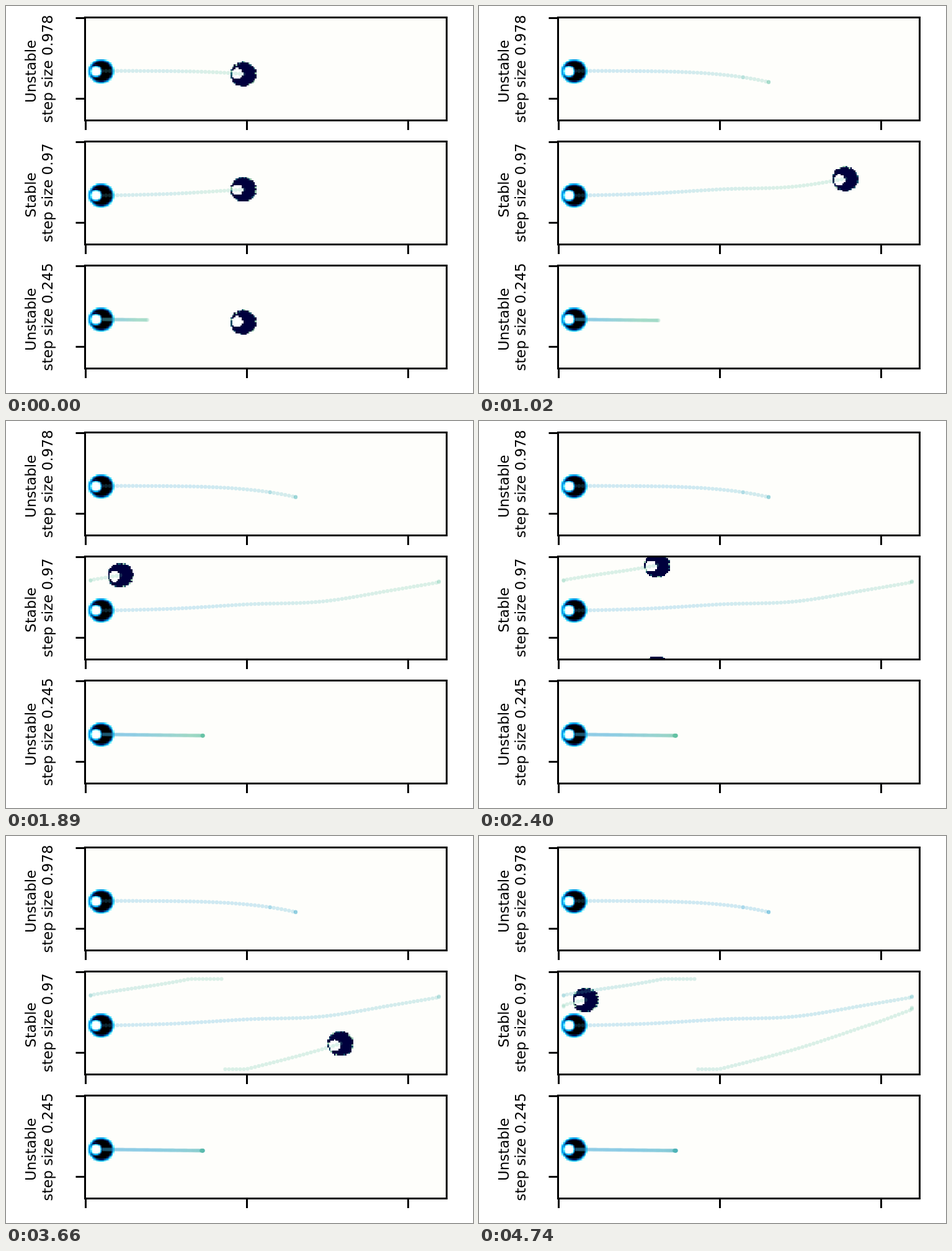
Recreate the animation shown at these times as an HTML page with a canvas. Size 753x624 px, loop 4770 ms.

```html
<!DOCTYPE html>
<html lang="en">
<head>
<meta charset="utf-8">
<title>Step size stability</title>
<style>
  html, body { margin: 0; width: 100%; height: 100%; overflow: hidden; background: #fff; }
  canvas, svg { position: absolute; left: 0; top: 0; }
  text { font: 22.92px "DejaVu Sans", sans-serif; text-anchor: middle; }
</style>
</head>
<body>
<canvas id="stage" width="753" height="624"></canvas>
<svg width="753" height="624">
  <defs>
    <g id="axes" fill="none" stroke="#000" stroke-width="3">
      <rect x="127.5" y="18.5" width="583" height="166"/>
      <path d="M128.5 185v15M388.5 185v15M648.5 185v15M112.5 19.5H128M112.5 149.5H128"/>
    </g>
  </defs>
  <use href="#axes"/>
  <use href="#axes" y="200"/>
  <use href="#axes" y="400"/>
  <g transform="translate(48 105.4) rotate(-90)"><text>Unstable</text></g>
  <g transform="translate(75 101.5) rotate(-90)"><text>step size 0.978</text></g>
  <g transform="translate(48 304.6) rotate(-90)"><text>Stable</text></g>
  <g transform="translate(75 301.2) rotate(-90)"><text>step size 0.97</text></g>
  <g transform="translate(48 505.4) rotate(-90)"><text>Unstable</text></g>
  <g transform="translate(75 501.5) rotate(-90)"><text>step size 0.245</text></g>
</svg>
<script>
const ctx = document.getElementById('stage').getContext('2d');
const LOOP = 4770, STEP = 30, LEAD = 37;
const CELL = 2.6, COLS = 224, ROWS = 64;
const LEFT = 128.2, TOP = 18.5, W = COLS * CELL, H = ROWS * CELL;
const X0 = 155, Y0 = 105.3;

const clamp = (v, a = 0, b = 1) => Math.min(b, Math.max(a, v));
const mod = (v, m) => ((v % m) + m) % m;
const rgb = (c, a = 1) => `rgba(${c.map(v => Math.round(clamp(v, 0, 255)))},${a})`;
const hash = (a, b, c) => mod(Math.sin(a * 12.99 + b * 78.23 + c * 37.7) * 43758.55, 1);

// Catmull-Rom through evenly spaced heights, t from 0 to 1.
function spline(pts, t) {
  const s = clamp(t) * (pts.length - 1), i = Math.min(pts.length - 2, Math.floor(s)), f = s - i;
  const at = k => pts[clamp(k, 0, pts.length - 1)];
  const [a, b, c, d] = [at(i - 1), at(i), at(i + 1), at(i + 2)];
  return b + f / 2 * (c - a + f * (2 * a - 5 * b + 4 * c - d + f * (3 * (b - c) + d - a)));
}

// Unwrapped x by step and y by x; nothing moves after the last step.
const heights = [105.5, 102.5, 95.5, 91, 72, 52, 33.5, 6.5, -25, -64, -102];
const glide = n => X0 + 6.18 * n - .00062 * n * n;
const fading = {
  x: n => Math.min(467, glide(n - clamp(n - 44))),
  y: x => Y0 - .6 + 18 * ((x - X0) / 312) ** 4,
  end: 54
};
const gliding = {
  x: glide,
  y: x => spline(heights, (x - X0) / 1181.5),
  end: Infinity
};
const crawling = {
  x: n => 318 - 163 * (1 - clamp(n / 90)) ** 1.12 - .15 * Math.max(0, n - 90),
  y: x => Y0 + 2 * (x - X0) / 163,
  end: 110
};
const panels = [
  { trail: fading, body: fading },
  { trail: gliding, body: gliding },
  { trail: crawling, body: fading }
];

// Paints the grid cells around a point, wrapping at the panel edges.
function cells(cx, cy, color) {
  const ci = Math.round((cx - LEFT) / CELL), cj = Math.round((cy - TOP) / CELL);
  for (let j = cj - 10; j <= cj + 10; j++) {
    for (let i = ci - 10; i <= ci + 10; i++) {
      const c = color(LEFT + (i + .5) * CELL - cx, TOP + (j + .5) * CELL - cy, i, j);
      if (!c) continue;
      const u = mod(i, COLS), v = mod(j, ROWS);
      const x = Math.round(LEFT + u * CELL), y = Math.round(TOP + v * CELL);
      ctx.fillStyle = c;
      ctx.fillRect(x, y, Math.round(LEFT + (u + 1) * CELL) - x, Math.round(TOP + (v + 1) * CELL) - y);
    }
  }
}

// White through cyan and blue to black.
const ocean = v => rgb([255 - 765 * v, 319 - 408 * v, 408 - 446 * v]);

function startColor(dx, dy) {
  const d = Math.hypot(dx * .95, dy * 1.02);
  if (d > 21) return null;
  return ocean(clamp((21 - d) / 6.5) * clamp((Math.hypot(dx + 8.5, dy) - 6.8) / 4.5));
}

const edge = ['#00003d', '#00003d', '#16506a', '#8fbfa5'];
function drawBody(path, n) {
  if (n >= path.end) return;
  const x = path.x(n), y = path.y(x);
  const slope = (path.y(x + 20) - path.y(x - 20)) / 40;
  const size = Math.sqrt(clamp((path.end - n) / 9));
  const r = 19.6 * size, hole = 8.8 * size;
  cells(x, y, (dx, dy, i, j) => {
    const d = Math.hypot(dx * .95, dy);
    const noise = hash(i, j, n);
    if (Math.hypot(dx + 9.5 * size, dy + 9.5 * slope * size) < hole) return '#fff';
    if (d < r - 1.5) return '#00003d';
    return d < r + .4 ? edge[Math.floor(noise * 4)] : null;
  });
}

function drawTrail(path, n) {
  const last = Math.min(n, path.end);
  for (let i = 0; i <= last; i++) {
    const px = path.x(i);
    const x = clamp(LEFT + mod(px - LEFT, W), 136.5, 698);
    const y = clamp(TOP + mod(path.y(px) - TOP, H), 30.5, 176);
    const k = Math.max(clamp((i / n - .25) / .5), .9 - n / 80);
    ctx.fillStyle = rgb([50 + 50 * k, 165 + 28 * k, 210 - 45 * k], .23);
    ctx.beginPath();
    ctx.arc(x, y, 3.1, 0, 7);
    ctx.fill();
  }
}

function draw(n) {
  ctx.clearRect(0, 0, 753, 624);
  panels.forEach(({ trail, body }, p) => {
    ctx.save();
    ctx.translate(0, p * 200);
    ctx.beginPath();
    ctx.rect(128, 18, 583, 167);
    ctx.clip();
    ctx.fillStyle = '#fefefb';
    ctx.fillRect(128, 18, 583, 167);
    cells(153.5, Y0, startColor);
    drawBody(body, n);
    drawTrail(trail, n);
    ctx.restore();
  });
}

const start = performance.now();
let shown = -1;
function tick() {
  const n = LEAD + Math.floor((performance.now() - start) % LOOP / STEP);
  if (n !== shown) draw(shown = n);
  requestAnimationFrame(tick);
}
tick();
</script>
</body>
</html>
```
